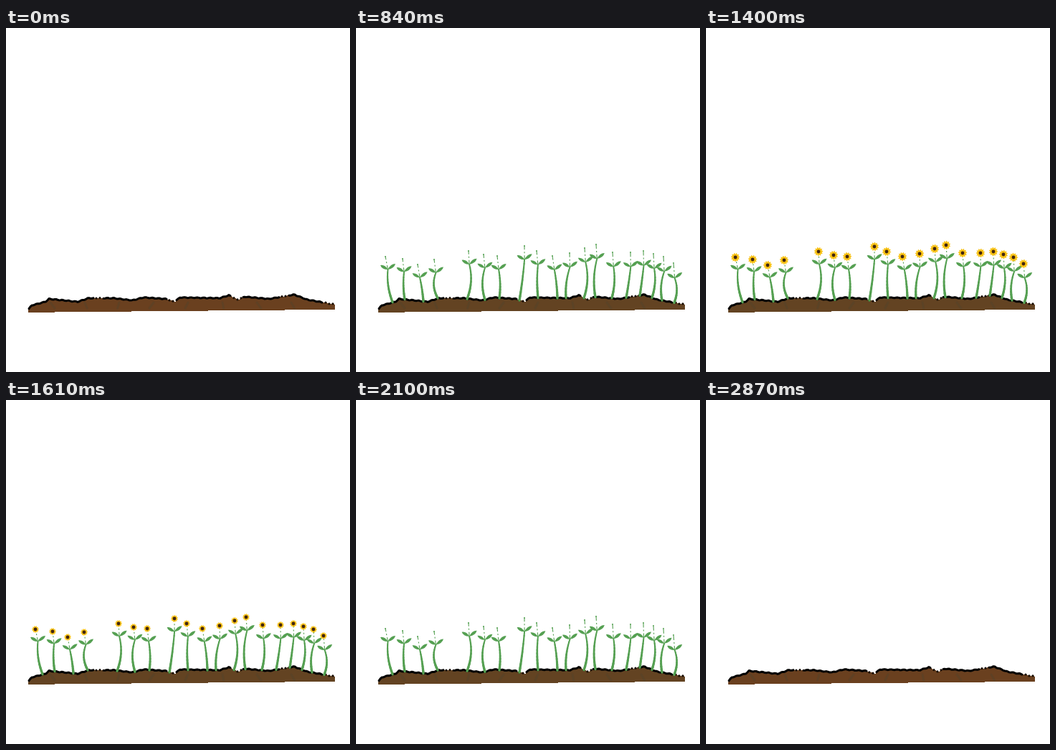
These frames come from a looping animation (480x480 px, 2.94 s). An HTML page with a canvas:

```html
<!DOCTYPE html>
<html lang="en">
<head>
<meta charset="utf-8">
<title>Growing flowers</title>
<style>
html, body { margin: 0; width: 100%; height: 100%; overflow: hidden; background: #fff; }
canvas { display: block; width: 480px; height: 480px; }
</style>
</head>
<body>
<canvas id="stage" width="480" height="480"></canvas>
<script>
const ctx = document.getElementById('stage').getContext('2d');
const STEP = 70, STEPS = 42;
const LEFT = 31, RIGHT = 459;
const GREEN = '#55a052';

// Key points of the ridge, and the spans where its outline breaks into dots
const ridge = [[31, 393], [36, 387], [55, 382], [60, 378], [100, 382], [115, 377], [150, 377], [176, 380], [192, 376],
  [223, 378], [235, 382], [243, 376], [298, 377], [311, 373], [323, 379], [333, 375], [367, 378], [402, 372],
  [420, 379], [460, 386]];
const gaps = [[122, 138], [224, 239], [314, 331], [381, 395], [442, 460]];

// Flower x and y, and how far the root lies to the right of the flower
const flowers = [[41, 320, 10], [65, 323, 3], [86, 331, 8], [109, 324, 5], [157, 312, -2], [178, 317, 2], [197, 319, 3],
  [235, 305, -7], [252, 312, 2], [274, 319, 7], [298, 315, -5], [319, 308, -1], [335, 303, -1], [358, 314, -1],
  [383, 314, -6], [401, 312, -5], [415, 316, -2], [429, 320, -2], [443, 329, 1]];

const clamp = v => Math.max(0, Math.min(1, v));
const mix = (a, b, u) => a + (b - a) * u;

function ridgeY(x) {
  const i = ridge.findIndex(p => p[0] > x);
  const [a, b] = [ridge[i - 1], ridge[i]];
  return mix(a[1], b[1], (x - a[0]) / (b[0] - a[0])) + .5 * Math.sin(x * .7);
}

function disc(x, y, r, color) {
  ctx.fillStyle = color;
  ctx.beginPath();
  ctx.arc(x, y, r, 0, Math.PI * 2);
  ctx.fill();
}

function line(points, width, color) {
  ctx.lineWidth = width;
  ctx.strokeStyle = color;
  ctx.beginPath();
  points.forEach(p => ctx.lineTo(p[0], p[1]));
  ctx.stroke();
}

function soil(bare) {
  ctx.fillStyle = bare ? '#6a401f' : '#634322';
  for (let x = LEFT; x < RIGHT; x++) {
    const top = Math.round(ridgeY(x));
    ctx.fillRect(x, top, 1, 397 - Math.round((x - 14) / 107) - top);
  }
  for (let i = 0; i < 8; i++) {
    const x = 62 + i * 48;
    line([[x, 383], [x + 6 * Math.cos(i), 391]], 3, 'rgba(80,68,45,.4)');
  }
  let from = LEFT + 1;
  for (const [a, b] of gaps) {
    const run = [];
    for (let x = from; x <= a; x += 2) run.push([x, ridgeY(x)]);
    line(run, 3, '#000');
    for (let x = a + 4; x < b; x += 5) disc(x, ridgeY(x), 1.6, '#1a0f06');
    from = b;
  }
}

// The curve passes through mid halfway along
function stem(root, mid, node, grown) {
  const bend = mid.map((m, i) => 2 * m - (root[i] + node[i]) / 2);
  const at = t => [0, 1].map(i => mix(mix(root[i], bend[i], t), mix(bend[i], node[i], t), t));
  for (let i = 0; i < 10; i++) {
    line([at(grown * i / 10), at(grown * (i + 1) / 10)], mix(3.4, 2, i / 9), GREEN);
  }
}

function leaf(x, y, dx, dy, u) {
  if (u <= 0) return;
  const size = Math.hypot(dx, dy), px = -dy / size * 4.2 * u, py = dx / size * 4.2 * u;
  const mx = x + dx * u * .6, my = y + dy * u * .6;
  ctx.fillStyle = GREEN;
  ctx.beginPath();
  ctx.moveTo(x, y);
  ctx.quadraticCurveTo(mx + px, my + py, x + dx * u, y + dy * u);
  ctx.quadraticCurveTo(mx - px, my - py, x, y);
  ctx.fill();
}

function bloom(x, y, k) {
  const r = 2 + (k - 13) * .65, open = clamp((k - 15) / 3);
  ctx.fillStyle = `rgb(${mix(190, 248, open)},${mix(130, 194, open)},${mix(24, 20, open)})`;
  ctx.beginPath();
  for (let i = 0; i < 22; i++) {
    const a = i * Math.PI / 11 + x, d = i % 2 ? r * .7 : r;
    ctx.lineTo(x + Math.cos(a) * d, y + Math.sin(a) * d);
  }
  ctx.fill();
  disc(x, y, Math.min(2.4, r * .75), '#42260f');
}

function plant([fx, fy, lean], i, k) {
  const rx = fx + lean, ry = ridgeY(rx);
  const nx = fx + 1.5 + lean * .2, ny = fy + 17 + i / 6;
  const sway = 3.5 * Math.cos(2.693 * (i - 4)) - lean * .2;
  stem([rx, ry], [(rx + nx) / 2 + sway, (ry + ny) / 2], [nx, ny], clamp(k / 7.5));

  // Every second plant opens one leaf early
  const early = i % 2 ? 0 : i % 6 === 2 ? 1 : -1;
  for (const side of [-1, 1]) {
    const begin = side === early ? 5.2 : 7;
    leaf(nx, ny, side * 10.5, side < 0 ? -6 : -8, clamp((k - begin) / 3));
  }

  const tip = clamp((k - 7) / 4);
  if (tip > 0) {
    const x = mix(nx, fx, tip), y = mix(ny, fy - 1, tip);
    ctx.setLineDash([6, 3, 2, 3]);
    ctx.lineCap = 'butt';
    line([[nx, ny], [x, y]], 1.1, GREEN);
    ctx.lineCap = 'round';
    ctx.setLineDash([]);
    disc(x, y, 1, GREEN);
  }
  if (k > 12) bloom(fx, fy, k);
}

function draw(now) {
  const step = Math.floor(now / STEP) % STEPS;
  const k = Math.min(step, STEPS - 1 - step);
  ctx.fillStyle = '#fff';
  ctx.fillRect(0, 0, 480, 480);
  ctx.lineJoin = ctx.lineCap = 'round';
  soil(k === 0);
  if (k > 0) flowers.forEach((f, i) => plant(f, i, k));
}

let start;
function tick(now) {
  start ??= now;
  draw(now - start);
  requestAnimationFrame(tick);
}
draw(0);
requestAnimationFrame(tick);
</script>
</body>
</html>
```
